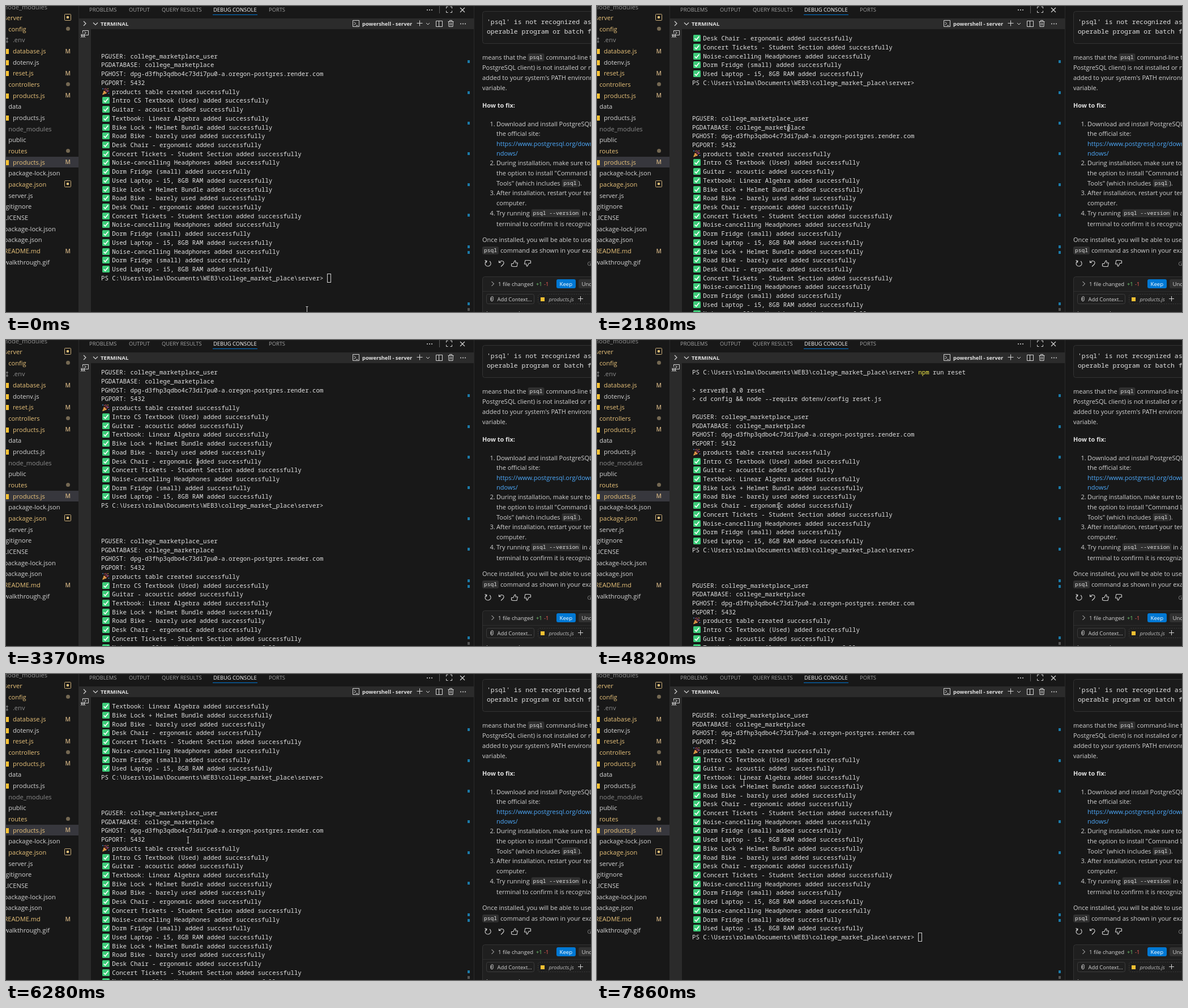
Write an HTML page with a canvas that moves like this. It is 1033 px wide and 542 px high and loops after 8 s.

```html
<!DOCTYPE html>
<html lang="en">
<head>
<meta charset="utf-8">
<title>Terminal scrollback</title>
<style>
html, body { margin: 0; width: 100%; height: 100%; overflow: hidden; background: #181818; }
canvas { display: block; width: 1033px; height: 542px; }
</style>
</head>
<body>
<canvas id="stage"></canvas>
<script>
const W = 1033, H = 542, LOOP = 8000;
const canvas = document.getElementById('stage');
const ctx = canvas.getContext('2d');
const dpr = window.devicePixelRatio || 1;
canvas.width = W * dpr;
canvas.height = H * dpr;

const SANS = '"Open Sans", "Noto Sans", sans-serif';
const MONO = '"Noto Sans Mono", "DejaVu Sans Mono", monospace';
const FG = '#d4d4d4', BRIGHT = '#e2e2e2', DIM = '#8c8c8c', MOD = '#e8c27a';
const BAR = '#2b2b2b', BLUE = '#0078d4', YELLOW = '#f5c032';
const CELL = 6.44, ROW = 15.72, LEFT = 168, FIRST = 57.3;

// ---- terminal content ----
const PROMPT = 'PS C:\\Users\\rolma\\Documents\\WEB3\\college_market_place\\server>';
const ITEMS = ['Intro CS Textbook (Used)', 'Guitar - acoustic', 'Textbook: Linear Algebra',
  'Bike Lock + Helmet Bundle', 'Road Bike - barely used', 'Desk Chair - ergonomic',
  'Concert Tickets - Student Section', 'Noise-cancelling Headphones', 'Dorm Fridge (small)',
  'Used Laptop - i5, 8GB RAM'];
const added = from => ITEMS.slice(from).map(s => ({ icon: 'check', text: s + ' added successfully' }));
const plain = (...rows) => rows.map(text => ({ text }));
const header = [
  ...plain('PGUSER: college_marketplace_user', 'PGDATABASE: college_marketplace',
    'PGHOST: dpg-d3fhp3qdbo4c73di7pu0-a.oregon-postgres.render.com', 'PGPORT: 5432'),
  { icon: 'party', text: 'products table created successfully' }
];
const lines = [
  { text: PROMPT, cmd: true },
  ...plain('', '> server@1.0.0 reset', '> cd config && node --require dotenv/config reset.js', ''),
  ...header, ...added(0),
  ...plain(PROMPT, '', '', ''),
  ...header, ...added(0), ...added(3), ...added(7),
  { text: PROMPT, cursor: true }
];

// ---- timeline: [ms, first visible line] and [ms, pointer x, pointer y] ----
const scroll = [[0, 22], [1660, 21], [1790, 19], [1920, 17], [2180, 15], [2310, 13], [2440, 12],
  [2830, 10], [2960, 8], [3090, 7], [3370, 5], [3500, 3], [4170, 1], [4300, 0],
  [5080, 1], [5210, 3], [5340, 5], [5490, 6], [6020, 8], [6150, 10], [6280, 12],
  [6660, 15], [6790, 18], [6920, 21], [7450, 22], [7580, 23]];
const pointer = [[0, 531.5, 538], [890, 490, 468], [1020, 410, 350], [1150, 345, 262], [1270, 314, 224],
  [1400, 338, 216], [3750, 314, 180], [3890, 300, 127], [4560, 213, 196], [4680, 299, 258],
  [4820, 321, 294], [7730, 286, 238], [7860, 259, 192]];
const at = (keys, t) => keys.reduce((a, k) => k[0] <= t ? k : a);

// ---- drawing helpers ----
// Baselines sit on whole pixels so that the small text stays crisp.
function text(s, x, y, color = FG, size = 11.1, style = '', family = SANS) {
  ctx.font = `${style} ${size}px ${family}`;
  ctx.fillStyle = color;
  ctx.fillText(s, x, Math.round(y));
  return ctx.measureText(s).width;
}
const mono = (s, x, y, color, size) => text(s, x, y, color, size, '500', MONO);
function rect(x, y, w, h, color) {
  ctx.fillStyle = color;
  ctx.fillRect(x, y, w, h);
}
function round(x, y, w, h, r, fill, stroke) {
  ctx.beginPath();
  ctx.roundRect(x, y, w, h, r);
  if (fill) { ctx.fillStyle = fill; ctx.fill(); }
  if (stroke) { ctx.strokeStyle = stroke; ctx.lineWidth = 1; ctx.stroke(); }
}
function dot(x, y, r, color) {
  ctx.fillStyle = color;
  ctx.beginPath();
  ctx.arc(x, y, r, 0, Math.PI * 2);
  ctx.fill();
}
function icon(d, x, y, color = FG, width = 1) {
  ctx.save();
  ctx.translate(x, y);
  ctx.strokeStyle = color;
  ctx.lineWidth = width;
  ctx.stroke(new Path2D(d));
  ctx.restore();
}
const dots = (x, y) => [-4, 0, 4].forEach(i => dot(x + i, y, 1, FG));
const RIGHT = 'M-2 -4L2 0L-2 4', DOWN = 'M-4 -2L0 2L4 -2', PLUS = 'M-5 0H5M0 -5V5';
const THUMB = 'M-5.5 0H-2.5L0.5 -5.5Q2.5 -5.5 2 -1.5H5.5L4 5H-2.5L-5.5 4Z';

// ---- sidebar: [label, indent level, colour, badge, icon] ----
const files = [
  ['node_modules', 0, DIM], ['server', 0, MOD, 'box'], ['config', 1, MOD, 'dot'], ['.env', 2, DIM, '', 'gear'],
  ['database.js', 2, MOD, 'M', 'js'], ['dotenv.js', 2, FG, '', 'js'], ['reset.js', 2, MOD, 'M', 'js'],
  ['controllers', 1, MOD, 'dot'], ['products.js', 2, MOD, 'M', 'js'], ['data', 1, FG],
  ['products.js', 2, FG, '', 'js'], ['node_modules', 1, DIM], ['public', 1, FG], ['routes', 1, MOD, 'dot'],
  ['products.js', 2, MOD, 'M', 'js'], ['package-lock.json', 1, FG], ['package.json', 1, MOD, 'box'],
  ['server.js', 1, FG], ['.gitignore', 0, FG], ['LICENSE', 0, FG], ['package-lock.json', 0, FG],
  ['package.json', 0, FG], ['README.md', 0, MOD, 'M'], ['walkthrough.gif', 0, FG]
];
function sidebar() {
  rect(0, 267, 128, 19, '#37373d');
  files.forEach(([name, level, color, badge, mark], i) => {
    const y = 1.5 + 19.66 * i;
    text(name, -3.5 + 7.7 * level, y + 4, color);
    if (mark === 'js') rect(-4, Math.round(y) - 4, 9, 9, YELLOW);
    if (mark === 'gear') icon('M-1 -3H4M-1 3H4M2 -5V5', 0, y, DIM);
    if (badge === 'M') text('M', 104.5, y + 3.6, '#c9ac7f', 10.3, '600');
    if (badge === 'dot') dot(109.5, y - 0.5, 3.5, '#746852');
    if (badge === 'box') {
      round(103.5, Math.round(y) - 6.5, 11, 11, 1, null, '#d0b27c');
      dot(109, Math.round(y) - 1, 2.3, MOD);
    }
  });
  rect(128, 0, 1, H, BAR);
}

function panelBars() {
  rect(129, 22, 698, 19, BAR);
  rect(129, 41, 21, H - 41, BAR);
  [['PROBLEMS', 147], ['OUTPUT', 217], ['QUERY RESULTS', 275], ['DEBUG CONSOLE', 366], ['PORTS', 464]]
    .forEach(([s, x], i) => text(s, x, 10.2, i === 3 ? '#ffffff' : '#a4a4a4', 9.35));
  rect(365, 15, 79, 1, BLUE);
  dots(748, 7);
  rect(765, 0, 1, 13, '#5a5a5a');
  icon('M-5 -2V-5H-2M2 -5H5V-2M5 2V5H2M-2 5H-5V2', 782.5, 6.5);
  icon('M-4 -4L4 4M4 -4L-4 4', 806, 7, FG, 1.2);

  icon(RIGHT, 139, 31, FG, 1.2);
  icon(DOWN, 158, 31.5, FG, 1.2);
  text('TERMINAL', 167, 35, BRIGHT, 9.6, 'bold');
  icon('M-5.5 -5.5H5.5V5.5H-5.5ZM-3.5 -3L-0.5 0L-3.5 3M0 3.5H3.5', 618, 31);
  text('powershell - server', 629, 35, BRIGHT, 9.3, 'bold');
  icon(PLUS, 730.5, 30.5);
  icon('M-3 -1.5L0 1.5L3 -1.5', 745, 31.5);
  icon('M-5 -5H6V5H-5ZM0 -5V5', 764.5, 31.5);
  icon('M-5 -3H5M-2 -3V-5H2V-3M-4 -3L-3.5 6H3.5L4 -3M-1.3 -1V4M1.3 -1V4', 785.5, 30.5);
  dots(807, 31.5);
  icon('M-4 -1V-5H6V3H1M-1 -3L2 -1L-1 1', 139.5, 48.5);
  icon('M-5 2Q-3 -1 -1 2V5Q-3 8 -5 5ZM-7 3.5H1M-7 1L-5 2M1 1L-1 2M-7 7L-5 5M1 7L-1 5', 139, 49);
}

// ---- chat ----
function code(s, x, y) {
  ctx.font = `500 9.6px ${MONO}`;
  const w = ctx.measureText(s).width + 6;
  round(x, Math.round(y) - 7, w, 14, 3, '#303030');
  mono(s, x + 3, y + 3.4, BRIGHT, 9.6);
  return w;
}
// Parts in backticks become inline code.
function flow(s, x, y, color) {
  s.split('`').forEach((part, i) => {
    if (part) x += i % 2 ? code(part, x, y) : text(part, x, y + 4, color, 11);
  });
}
const prose = [
  [841, 91, 'means that the `psql` command-line tool (the'],
  [841, 109.3, 'PostgreSQL client) is not installed or not'],
  [841, 127, "added to your system's PATH environment"], [841, 144.6, 'variable.'],
  [866, 208.7, 'Download and install PostgreSQL from'], [866, 226, 'the official site:'],
  [866, 278.3, 'During installation, make sure to check'], [866, 296, 'the option to install "Command Line'],
  [866, 313.5, 'Tools" (which includes `psql`).'], [866, 331.3, 'After installation, restart your terminal'],
  [866, 349, 'computer.'], [866, 367, 'Try running `psql --version` in a new'],
  [866, 385.5, 'terminal to confirm it is recognized.'],
  [841, 414.3, 'Once installed, you will be able to use the'],
  [841, 432.5, '`psql` command as shown in your example.']
];
function chat() {
  rect(826, 0, 1, H, BAR);
  round(841.5, 9.5, 220, 57, 4, '#1b1b1b', '#333333');
  mono("'psql' is not recognized as an", 849, 32, BRIGHT, 11.4);
  mono('operable program or batch file.', 849, 49, BRIGHT, 11.4);
  prose.forEach(([x, y, s]) => flow(s, x, y, FG));
  text('How to fix:', 841, 180, BRIGHT, 10.8, 'bold');
  [208.7, 278.3, 331.3, 367].forEach((y, i) => text(i + 1 + '.', 854.5, y + 4, FG, 11));
  flow('https://www.postgresql.org/download/wi', 866, 243.7, '#4daafc');
  flow('ndows/', 866, 261, '#4daafc');

  icon('M-2.5 -4.2A5 5 0 1 0 3 -4M-5.5 -5.5L-2 -4.3L-3 -1', 851, 456, FG, 1.1);
  icon('M-4.5 -5V-1.5H-1M-4.5 -1.5Q0 -6.5 3.5 -3Q6 0 -1 5.5', 875, 456, FG, 1.1);
  icon(THUMB, 898, 456.5, FG, 1.1);
  ctx.save();
  ctx.translate(921, 455.5);
  ctx.scale(-1, -1);
  icon(THUMB, 0, 0, FG, 1.1);
  ctx.restore();
  text('G', 1026.5, 460, DIM, 9.4);

  round(841.5, 479.5, 220, 90, 4, '#1f1f1f', '#333333');
  rect(842, 505, 191, 1, '#2e2e2e');
  icon(RIGHT, 859.5, 492);
  text('1 file changed', 869, 496, FG, 9.6);
  text('+1', 936, 496, '#73d173', 9.4, '500');
  text('-1', 950, 496, '#ff6058', 9.4, '500');
  round(972, 484, 34, 16, 3, BLUE);
  text('Keep', 977.5, 496, '#ffffff', 9.6);
  round(1011, 484, 40, 16, 3, '#313131');
  text('Undo', 1016.5, 496, FG, 9.6);
  round(848.5, 510.5, 84, 17, 3, null, '#3c3c3c');
  icon('M-2 -2V3Q0 6 2 3V-3Q0.5 -6 -1 -3V2.5', 858, 518.5);
  text('Add Context...', 867.5, 523, FG, 9.4);
  ctx.setLineDash([2, 2]);
  round(939.5, 510.5, 120, 17, 3, null, '#3c3c3c');
  ctx.setLineDash([]);
  rect(944, 516, 7, 7, YELLOW);
  text('products.js', 958.5, 523, '#bdbdbd', 9.2, 'italic');
  icon('M-4.5 0H4.5M0 -4.5V4.5', 1014.5, 518.5);
  text('h', 848, 549, FG, 11);
  text('l', 905, 549, FG, 11);
}

// ---- terminal ----
function check(y) {
  round(170, Math.round(y) - 6, 13, 12, 1.5, '#3ccb78');
  icon('M-3.8 0.3L-1.2 3L3.8 -3.2', 176.5, Math.round(y), '#ffffff', 1.8);
}
function party(y) {
  ctx.fillStyle = '#e8b04a';
  ctx.beginPath();
  ctx.moveTo(170, y + 6);
  ctx.lineTo(173, y - 2);
  ctx.lineTo(178, y + 3);
  ctx.fill();
  icon('M-2.5 -1.5L2 3M-4 1.5L-1.5 4', 176, y, '#b4533c', 1.2);
  icon('M0 -1Q2 -3 0 -6M2 1Q4 -2 6 -1', 176, y, '#c9506e', 1.1);
  [[171, -5, '#4a9be0'], [174, -4.5, '#d0566f'], [180, -5, '#e8b04a'], [181.5, 3, '#4a9be0'], [179, -2, '#8f66c9']]
    .forEach(([x, dy, c]) => dot(x, y + dy, 0.9, c));
}
function terminal(top) {
  ctx.save();
  ctx.beginPath();
  ctx.rect(150, 42, 676, H - 42);
  ctx.clip();
  lines.slice(top, top + 32).forEach((line, i) => {
    const y = FIRST + ROW * i;
    const put = (s, col, color) => mono(s, LEFT + col * CELL, y + 4, color, CELL / 0.6);
    if (line.icon) (line.icon === 'check' ? check : party)(y);
    put(line.text, line.icon ? 3 : 0, BRIGHT);
    if (line.cmd) {
      put('npm', 62, '#f9f14a');
      put('run reset', 66, BRIGHT);
    }
    if (line.cursor) {
      ctx.strokeStyle = FG;
      ctx.lineWidth = 1;
      ctx.strokeRect(567.5, Math.round(y - 8) + 0.5, 6, 15);
    }
  });
  ctx.restore();
  [98, 153, 207, 261, 316, 370, 426, 436, 527].forEach(y => rect(815, y - 2, 4, 5, '#1b7aa8'));
  rect(815, 535, 4, 5, '#555555');
}
function beam(x, y) {
  icon('M-2 -5.5H2M0 -5V5M-2 5.5H2', Math.floor(x) + 0.5, y, '#c8c8c8');
}

function draw(t) {
  const [, top] = at(scroll, t), [, x, y] = at(pointer, t);
  ctx.setTransform(dpr, 0, 0, dpr, 0, 0);
  rect(0, 0, W, H, '#181818');
  sidebar();
  panelBars();
  terminal(top);
  chat();
  beam(x, y);
}

const start = performance.now();
function tick() {
  draw((performance.now() - start) % LOOP);
  requestAnimationFrame(tick);
}
tick();
</script>
</body>
</html>
```
